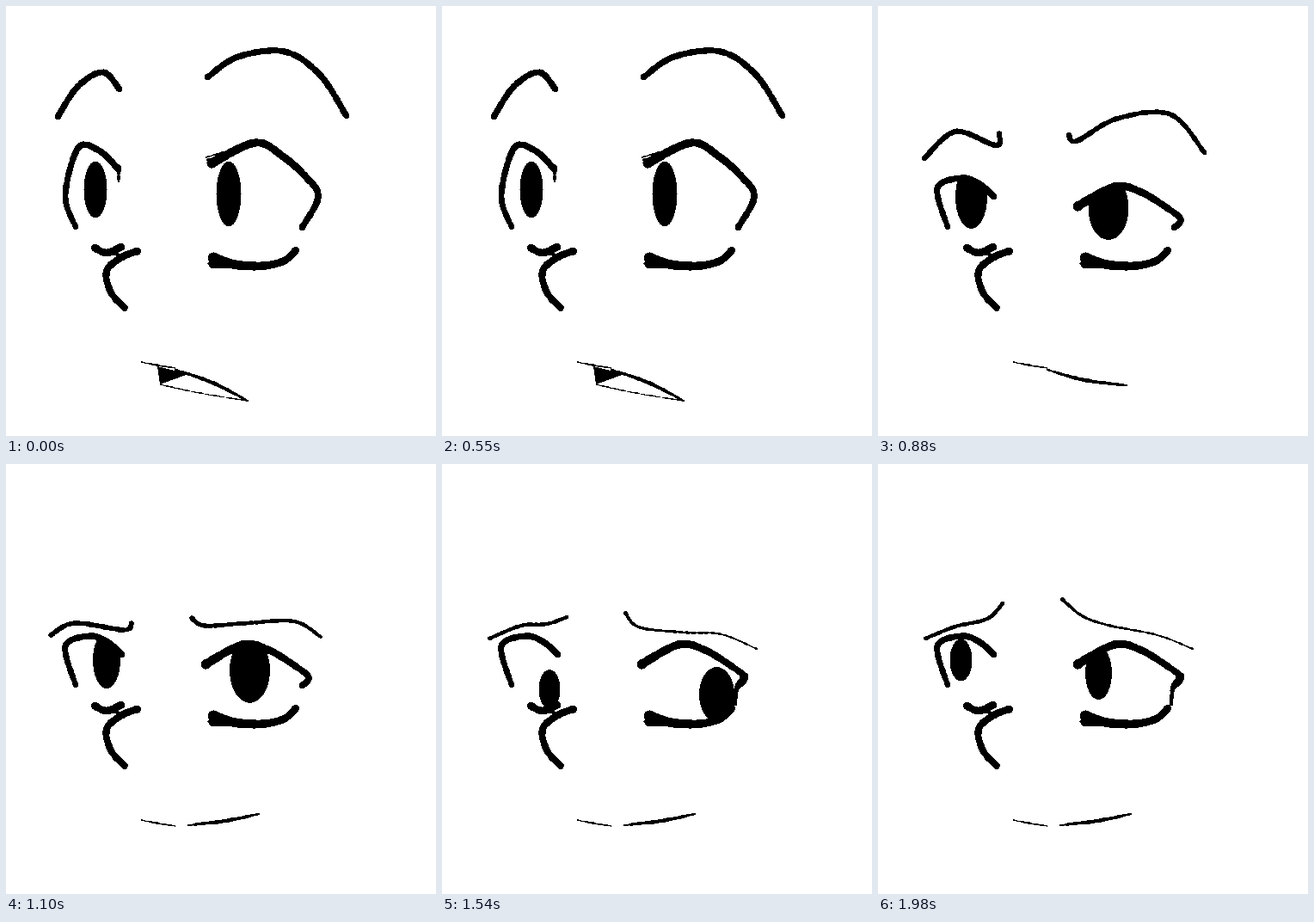
Animation, 500 px wide and 500 px high, one loop 2090 ms. Source, as an HTML page with a canvas:

```html
<!DOCTYPE html>
<html lang="en">
<head>
<meta charset="utf-8">
<title>Shifting glance</title>
<style>
html, body { margin: 0; width: 100%; height: 100%; overflow: hidden; background: #fff; }
/* strong contrast gives the hard edges of a pixel pen */
canvas { display: block; width: 500px; height: 500px; filter: contrast(20); }
</style>
</head>
<body>
<canvas id="stage" width="500" height="500"></canvas>
<script>
const ctx = document.getElementById('stage').getContext('2d');
const STEP = 110, STEPS = 19;

// Key poses by step: x, y pairs that are blended in between.
const leftBrow = {
  5: [60, 129, 84, 93, 113, 77, 132, 97],
  8: [54, 177, 90, 146, 137, 162, 141, 148],
  10: [52, 199, 80, 185, 137, 193, 146, 185],
  14: [55, 203, 92, 188, 122, 186, 145, 178],
  15: [55, 203, 90, 189, 127, 180, 145, 162]
};
const rightBrow = {
  5: [234, 83, 270, 59, 324, 53, 365, 80, 396, 128],
  8: [222, 150, 231, 157, 278, 131, 340, 126, 380, 171],
  10: [216, 179, 231, 188, 280, 185, 335, 183, 366, 201],
  14: [213, 173, 230, 190, 285, 196, 325, 198, 366, 215],
  15: [214, 157, 238, 177, 270, 188, 325, 199, 366, 215]
};
const leftLid = {
  5: [81, 257, 69, 220, 84, 165, 108, 168, 131, 190],
  8: [81, 257, 69, 212, 97, 200, 118, 207, 135, 222]
};
const rightLid = {
  5: [239, 183, 290, 159, 322, 175, 349, 199, 363, 222, 344, 258],
  8: [232, 233, 275, 210, 305, 216, 335, 234, 352, 248, 344, 258]
};
const corner = { 10: [352, 247, 350, 250, 346, 256], 14: [352, 247, 343, 260, 341, 280] };

// Pupils: centre, then radii.
const leftPupil = {
  5: [104, 213.5, 13.5, 33], 8: [108.5, 222, 18.5, 37], 10: [117, 228, 16, 33],
  14: [125, 262, 12.5, 23], 16: [103.5, 249.5, 13.5, 25], 18: [96.5, 228, 13, 24.5]
};
const rightPupil = {
  5: [259, 218.5, 14.5, 38], 8: [268, 235, 23.5, 37], 10: [283.5, 240, 23.5, 38],
  14: [319.5, 268, 20.5, 32], 15: [290, 267, 19, 30], 16: [272, 266, 18, 28],
  18: [256.5, 243, 15.5, 31]
};

const mouth = {
  5: [197, 423, 240, 438, 281, 459],
  8: [197, 423, 240, 435, 289, 441],
  10: [212, 420, 255, 415, 294, 407]
};
const lowerLip = { 5: [179, 440, 225, 450, 281, 459], 8: [179, 419, 225, 431, 289, 441] };

const mix = (a, b, u) => a + (b - a) * u;
const ramp = (t, a, b) => Math.min(1, Math.max(0, (t - a) / (b - a)));
const pairs = flat => flat.flatMap((v, i) => i % 2 ? [] : [[v, flat[i + 1]]]);

function pose(keys, step) {
  const at = Object.keys(keys).map(Number);
  const lo = at.filter(k => k <= step).pop() ?? at[0];
  const hi = at.find(k => k > step) ?? lo;
  const u = ramp(step, lo, hi) || 0;
  return pairs(keys[lo].map((v, i) => mix(v, keys[hi][i], u)));
}

// Catmull-Rom samples through the points
function spline(pts) {
  const out = [];
  for (let i = 0; i < pts.length - 1; i++) {
    const b = pts[i], c = pts[i + 1], a = pts[i - 1] || b, d = pts[i + 2] || c;
    const n = Math.ceil(Math.hypot(c[0] - b[0], c[1] - b[1]) * 2);
    for (let k = 0; k <= n; k++) {
      const t = k / n;
      out.push(b.map((v, j) => v + t / 2 * (c[j] - a[j] +
        t * (2 * a[j] - 5 * v + 4 * c[j] - d[j] + t * (3 * (v - c[j]) + d[j] - a[j])))));
    }
  }
  return out;
}

// A slightly uneven pen line whose width runs from one value to another
function brush(pts, from, to = from, belly = 0) {
  const line = spline(pts);
  line.forEach(([x, y], i) => {
    const u = i / line.length;
    const wobble = 0.6 * Math.sin(i * 0.3) * Math.sin(i * 0.11);
    const w = mix(from, to, Math.sqrt(u)) + belly * Math.sin(Math.PI * u) + wobble;
    ctx.beginPath();
    ctx.arc(x, y, Math.max(w, 0.9) / 2, 0, 7);
    ctx.fill();
  });
}

function trace(pts) {
  ctx.beginPath();
  pts.forEach(([x, y]) => ctx.lineTo(x, y));
  ctx.closePath();
}

function fill(pts) {
  trace(pts);
  ctx.fill();
}

// The pupil shows only below the upper lid.
function drawEye(lidKeys, pupilKeys, step, from, to) {
  const lid = pose(lidKeys, step);
  const [[x, y], [rx, ry]] = pose(pupilKeys, step);
  const left = lid[0][0] - 8, [endX, endY] = lid[lid.length - 1];
  ctx.save();
  trace([...spline(lid), [endX + 8, endY], [endX + 8, 330], [left, 330]]);
  ctx.clip();
  ctx.beginPath();
  ctx.ellipse(x, y, rx, ry, 0, 0, 7);
  ctx.fill();
  ctx.restore();
  brush(lid, from, to);
}

function drawBrow(keys, step, from, to) {
  const thin = ramp(step, 5, 14);
  brush(pose(keys, step), mix(6.5, from, thin), mix(6.5, to, thin));
}

function drawNose() {
  brush([[103, 281], [117, 287], [134, 280]], 8);
  brush([[122, 286], [135, 291]], 4);
  brush([[153, 285], [135, 292], [117, 308], [122, 333], [138, 351]], 8, 7);
}

function drawLowerLid() {
  brush([[241, 293], [268, 301], [300, 302], [324, 296], [337, 284]], 13, 7.5);
  fill([[234, 299], [238, 305], [270, 305], [246, 288]]);
}

function drawMouth(step) {
  brush([[157, 414], [178, 418], [197, 421]], 1, 1, 0.8);
  brush(pose(mouth, step), 1.5, 1.5, 2.5);
  if (step >= 8) return;
  const lip = pose(lowerLip, step);
  brush(lip, 1.2);
  fill([[176, 419], [212, 428], lip[0]]);
}

function drawLashes() {
  for (let i = 0; i < 4; i++) brush([[232 + i, 176 + i * 3], [254, 170 + i * 2]], 1, 2);
  brush([[131, 188], [131, 204]], 6, 2);
}

function draw(step) {
  ctx.fillStyle = '#fff';
  ctx.fillRect(0, 0, 500, 500);
  ctx.fillStyle = '#000';
  drawBrow(leftBrow, step, 4, 4);
  drawBrow(rightBrow, step, 4, 1.5);
  drawEye(leftLid, leftPupil, step, 5.5, 7);
  drawEye(rightLid, rightPupil, step, 11, 6.5);
  if (step > 10) brush(pose(corner, step), 9, 3);
  if (step < 6) drawLashes();
  drawLowerLid();
  drawNose();
  drawMouth(step);
}

let shown = -1;
function tick() {
  const step = Math.floor(performance.now() / STEP) % STEPS;
  if (step !== shown) draw(shown = step);
  requestAnimationFrame(tick);
}
tick();
</script>
</body>
</html>
```
